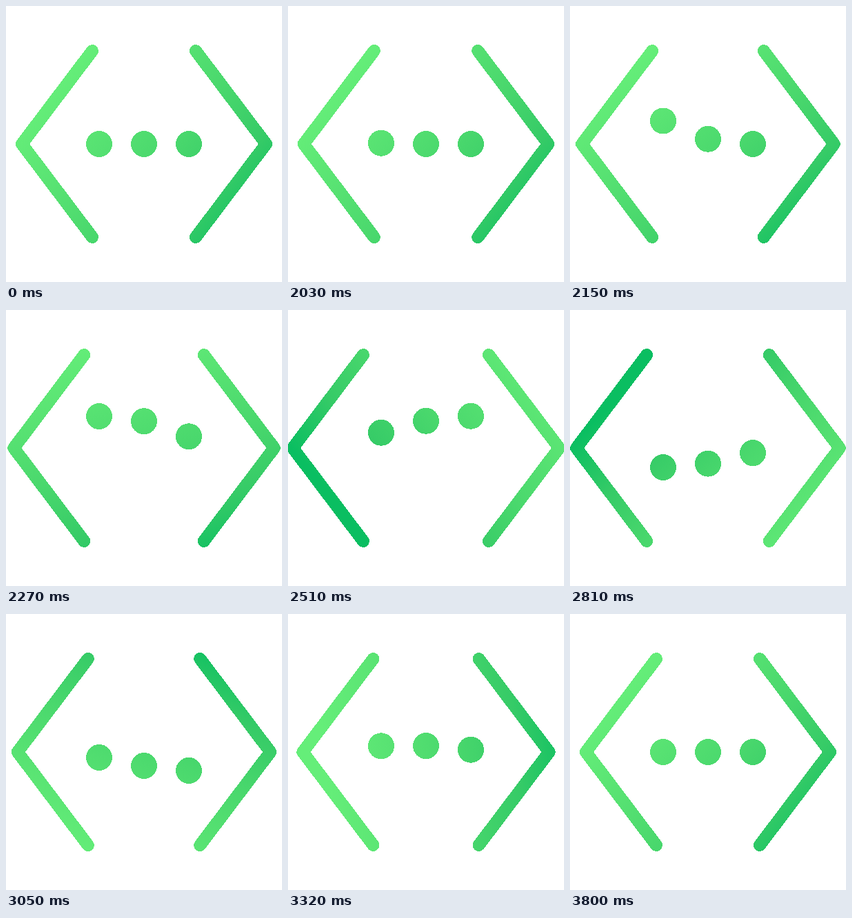
These frames come from a looping animation (400x400 px, 3.83 s). An HTML page:

```html
<!DOCTYPE html>
<html lang="en">
<head>
<meta charset="utf-8">
<title>Code brackets</title>
<style>
  html, body { margin: 0; width: 100%; height: 100%; overflow: hidden; background: #fff; }
  svg { display: block; width: 100vw; height: 100vh; }
</style>
</head>
<body>
<svg viewBox="0 0 400 400" shape-rendering="crispEdges">
  <defs>
    <linearGradient id="green" gradientUnits="userSpaceOnUse" x1="53" y1="205" x2="423" y2="205">
      <stop offset="0" stop-color="#65ee79"/>
      <stop offset=".25" stop-color="#59e373"/>
      <stop offset=".5" stop-color="#4ad86d"/>
      <stop offset=".75" stop-color="#36cb67"/>
      <stop offset="1" stop-color="#0abe61"/>
    </linearGradient>
  </defs>
  <g fill="none" stroke="url(#green)" stroke-width="18" stroke-linecap="round" stroke-linejoin="round">
    <path id="left"/>
    <path id="right"/>
  </g>
  <g fill="url(#green)">
    <circle class="dot" cx="135" r="19"/>
    <circle class="dot" cx="200" r="19"/>
    <circle class="dot" cx="265" r="19"/>
  </g>
</svg>
<script>
const LOOP = 3830, REST = 2030, STEP = 30, MOVE = 1800, DELAY = 90;

// Cubic Bezier easing, solved by bisection
function bezier(x1, y1, x2, y2) {
  const at = (a, b, u) => 3 * (1 - u) * (1 - u) * u * a + 3 * (1 - u) * u * u * b + u * u * u;
  return x => {
    if (x <= 0) return 0;
    if (x >= 1) return 1;
    let lo = 0, hi = 1;
    for (let i = 0; i < 24; i++) {
      const mid = (lo + hi) / 2;
      if (at(x1, x2, mid) < x) lo = mid; else hi = mid;
    }
    return at(y1, y2, lo);
  };
}

const ease = bezier(.25, .1, .25, 1);
const easeInOut = bezier(.42, 0, .58, 1);
const jump = bezier(.28, .1, .3, 1);
const settle = bezier(.3, 0, .3, 1);
const spin = bezier(.24, 0, .57, 1);

// Rows: time, value, easing towards that value
const SPREAD = [[0, 0], [600, 16.3, ease], [1650, 0, settle]];
const BOUNCE = [
  [0, 0],
  [295, -46.5, jump],
  [800, 28, easeInOut],
  [1250, -9.3, easeInOut],
  [1550, 0, easeInOut]
];

function track(rows, t) {
  if (t <= rows[0][0]) return rows[0][1];
  for (let i = 1; i < rows.length; i++) {
    const [t0, v0] = rows[i - 1], [t1, v1, curve] = rows[i];
    if (t < t1) return v0 + (v1 - v0) * curve((t - t0) / (t1 - t0));
  }
  return rows[rows.length - 1][1];
}

const left = document.getElementById('left');
const right = document.getElementById('right');
const green = document.getElementById('green');
const dots = document.querySelectorAll('.dot');

function draw(t) {
  const out = track(SPREAD, t);
  left.setAttribute('d', `M${125 - out} 65L${23 - out} 200L${125 - out} 335`);
  right.setAttribute('d', `M${275 + out} 65L${377 + out} 200L${275 + out} 335`);
  dots.forEach((dot, i) => dot.setAttribute('cy', 200 + track(BOUNCE, t - i * DELAY)));
  green.setAttribute('gradientTransform', `rotate(${41 + 360 * spin(t / MOVE)} 248 205)`);
}

const start = performance.now();
function tick() {
  const now = (performance.now() - start) % LOOP;
  draw(now < REST ? 0 : Math.floor((now - REST) / STEP) * STEP + STEP / 2);
  requestAnimationFrame(tick);
}
tick();
</script>
</body>
</html>
```
